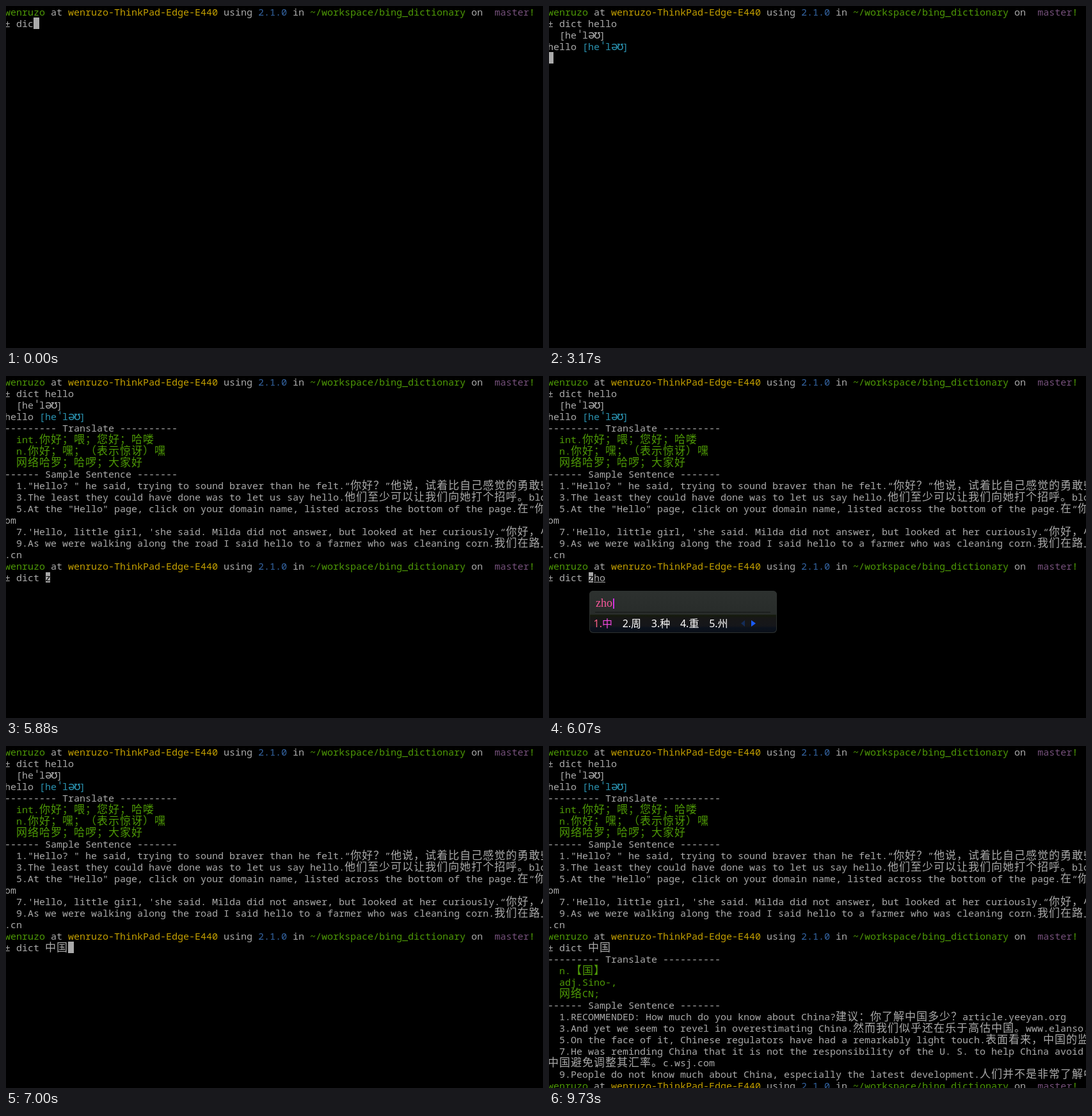
Animation, 839 px wide and 535 px high, one loop 9830 ms. Source, as an HTML page:

```html
<!DOCTYPE html>
<html lang="zh-CN">
<head>
<meta charset="utf-8">
<title>Terminal dictionary</title>
<style>
  html, body { margin: 0; width: 100%; height: 100%; overflow: hidden; background: #000; }
  #term {
    position: absolute; left: -2px; top: 0; width: 841px; height: 535px; overflow: hidden;
    font: 500 15px/18px "Noto Sans Mono", "DejaVu Sans Mono", monospace;
    font-variant-ligatures: none; text-spacing-trim: space-all; color: #aaa; white-space: pre;
  }
  #term div { height: 18px; }
  i { font-style: normal; }
  .green { color: #4e9a06; }
  .gold { color: #c4a000; }
  .blue { color: #3465a4; }
  .plum { color: #75507b; }
  .teal { color: #2a92b0; }
  .cjk { font: 17px/0 "Noto Sans CJK SC", "Noto Sans CJK JP", "Noto Sans CJK", sans-serif; letter-spacing: 1px; }
  .stop { font-family: "Noto Sans CJK JP", "Noto Sans CJK", sans-serif; }
  .ipa { font: 18px/0 "DejaVu Sans Mono", monospace; letter-spacing: -1.84px; }
  .caret { display: inline-block; width: 9px; height: 18px; vertical-align: top; background: #aaa; }
  .mark {
    display: inline-block; width: 7px; height: 16px; padding: 1px; line-height: 16px;
    vertical-align: top; text-indent: -1px; color: #000; background: #aaa content-box;
  }
  .pre { text-decoration: underline 1px; text-underline-offset: 1px; text-decoration-skip-ink: none; }

  #ime {
    position: absolute; left: 63px; top: 336px; height: 66px; border-radius: 6px; overflow: hidden;
    white-space: nowrap; color: #fff;
    background: linear-gradient(#2d312f, #282c2a 37px, #151b0c 38px, #171717 43px, #15161a 55px, #0a111c 58px, #0a0f18);
    box-shadow: inset 0 0 0 1px #2d312f;
  }
  #ime[hidden] { display: none; }
  #ime::before {
    content: ""; position: absolute; left: 9px; right: 10px; top: 33px; height: 1px; background: #131514;
  }
  #spell { height: 38px; padding-left: 10px; font: 18px/38px "Liberation Serif", serif; color: #f8589c; }
  #spell::after {
    content: ""; display: inline-block; width: 2px; height: 16px; margin-left: 1px;
    vertical-align: -3px; background: #d030e0;
  }
  #words {
    display: flex; gap: 15.7px; padding: 0 76px 0 6.5px;
    font: 16px/27px "Noto Sans", "Noto Sans CJK SC", "Noto Sans CJK JP", sans-serif;
  }
  #words span:first-child { color: #f048e0; }
  #words span:first-child i { color: #f86088; }
  #ime svg { position: absolute; right: 33px; top: 45px; }
</style>
</head>
<body>
<div id="term"></div>
<div id="ime" hidden>
  <div id="spell"></div><div id="words"></div>
  <svg width="23" height="12"><path d="M6 1V11L0 6Z" fill="#142c58"/><path d="M16 1V11L23 6Z" fill="#1a5cff"/></svg>
</div>
<script>
const LOOP = 9830;
const $ = id => document.getElementById(id);
const tint = (name, text) => `<i class="${name}">${text}</i>`;

const user = 'wenruzo';
const prompt = `${tint('green', user)} at ${tint('gold', user + '-ThinkPad-Edge-E440')} using ` +
  `${tint('blue', '2.1.0')} in ${tint('green', '~/workspace/bing_dictionary')} on  ` +
  tint('plum', 'master') + tint('green', '!');
const translate = '--------- Translate ----------';
const samples = '------ Sample Sentence -------';

const page = [
  prompt,
  '± dict hello',
  '  [heˈləʊ]',
  'hello ' + tint('teal', '[heˈləʊ]'),
  translate,
  tint('green', '  int.你好；喂；您好；哈喽'),
  tint('green', '  n.你好；嘿；（表示惊讶）嘿'),
  tint('green', '  网络哈罗；哈啰；大家好'),
  samples,
  '  1."Hello? " he said, trying to sound braver than he felt.“你好？”他说，试着比自己感觉的勇敢些',
  '  3.The least they could have done was to let us say hello.他们至少可以让我们向她打个招呼。blog',
  '  5.At the "Hello" page, click on your domain name, listed across the bottom of the page.在“你',
  'om',
  "  7.'Hello, little girl, 'she said. Milda did not answer, but looked at her curiously.“你好，小",
  '  9.As we were walking along the road I said hello to a farmer who was cleaning corn.我们在路上',
  '.cn',
  prompt,
  '± dict 中国',
  translate,
  tint('green', '  n.【国】'),
  tint('green', '  adj.Sino-,'),
  tint('green', '  网络CN;'),
  samples,
  '  1.RECOMMENDED: How much do you know about China?建议：你了解中国多少？article.yeeyan.org',
  '  3.And yet we seem to revel in overestimating China.然而我们似乎还在乐于高估中国。www.elanso.com',
  '  5.On the face of it, Chinese regulators have had a remarkably light touch.表面看来，中国的监管',
  '  7.He was reminding China that it is not the responsibility of the U. S. to help China avoid',
  '中国避免调整其汇率。c.wsj.com',
  '  9.People do not know much about China, especially the latest development.人们并不是非常了解中国',
  prompt
];

// Each step: start time, finished rows, current line, caret shown, pinyin, candidates
const steps = [];
const at = (time, rows, line, caret, pinyin = '', words = '') =>
  steps.push({ time, rows, line, caret, pinyin, words });
const type = (rows, start, keys, times) =>
  times.forEach((time, i) => at(time, rows, start + keys.slice(0, i + 1), true));
const compose = (time, pinyin, words) => at(time, 17, '± dict ', false, pinyin, words);

at(0, 1, '± dic', true);
type(1, '± dic', 't hello', [140, 230, 770, 860, 1000, 1080, 1290]);
at(1830, 1, '± dict hello', false);
at(2010, 2, '', true);
at(2570, 2, '', false);
at(3170, 4, '', true);
at(3215, 16, '', true);
at(3260, 17, '± ', true);
at(3800, 17, '± ', false);
type(17, '± ', 'dict ', [4330, 4415, 4500, 4760, 4870]);
at(5440, 17, '± dict ', false);
compose(5880, 'z');
compose(5920, 'z', '在 中 这 做 最');
compose(5980, 'zh', '这 中 之 只 着');
compose(6040, 'zho', '中 周 种 重 州');
compose(6100, 'zhon', '中 种 重 众 终');
compose(6160, 'zhong', '中 种 重 众 终');
compose(6220, 'zhong', '重要 中国 众所周知 终于 中心');
compose(6500, "zhong'g", '中国 中国男单 中关村 中高 重工');
at(6960, 17, '± dict ', true);
at(7000, 17, '± dict 中国', true);
at(7780, 18, '', false);
at(7820, 18, '', true);
at(8360, 18, '', false);
at(8960, 18, '', true);
at(9560, 18, '', false);
at(9730, 30, '', false);

// Full-width characters take two cells; some punctuation is centred in them
const wide = s => tint('cjk', s.replace(/[；：？，]/g, c => tint('stop', c)));
const row = html => '<div>' + html
  .replace(/[\u3000-\u9fff\uff00-\uffef]+/g, wide)
  .replace(/[ˈəʊ]+/g, s => tint('ipa', s)) + '</div>';

function show({ rows, line, caret, pinyin, words }) {
  const raw = pinyin.replace("'", '');
  if (raw) line += tint('mark', raw[0]) + tint('pre', raw.slice(1));
  if (caret) line += tint('caret', '');
  $('term').innerHTML = [...page.slice(0, rows), line].map(row).join('');

  $('ime').hidden = !words;
  $('spell').textContent = pinyin;
  $('words').innerHTML = words.split(' ').map((w, i) => `<span><i>${i + 1}.</i>${w}</span>`).join('');
}

let current;
function tick() {
  const t = performance.now() % LOOP;
  const step = steps.findLast(s => s.time <= t);
  if (step !== current) show(current = step);
  requestAnimationFrame(tick);
}
tick();
</script>
</body>
</html>
```
